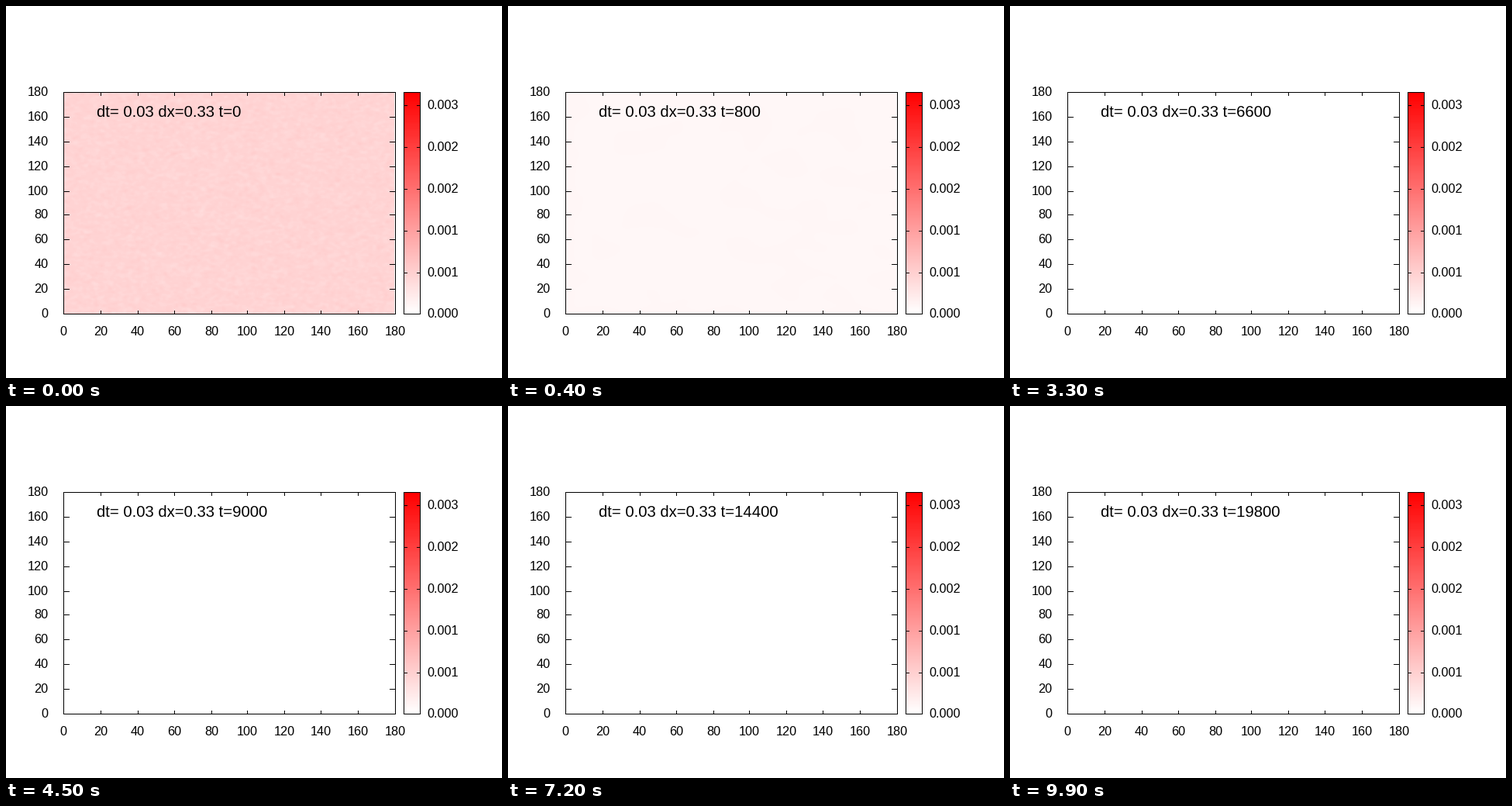
A matplotlib script for the animation above (10000 ms loop, 640 by 480 pixels).

```python
import numpy as np
import matplotlib.pyplot as plt
from matplotlib.animation import FuncAnimation
from matplotlib.colors import LinearSegmentedColormap
from matplotlib.patches import Rectangle

FRAMES, INTERVAL, STEP = 100, 100, 200
N = 180
LEFT, RIGHT, TOP, BOTTOM = 74, 502, 111, 397
BAR_L, BAR_R, BAR_STEP = 513, 534, 53.8
SMALL, LARGE = 16.2, 20.25  # text sizes in pixels

plt.rcParams["font.family"] = "Liberation Sans"
reds = LinearSegmentedColormap.from_list("reds", ["#ffffff", "#ff0000"])

noise_fft = np.fft.fft2(np.random.default_rng(7).standard_normal((N, N)))
freq = np.fft.fftfreq(N)
freq_sq = freq[:, None] ** 2 + freq[None, :] ** 2
cells = np.arange(N)
edge = np.exp(-cells / 2)[:, None] + np.exp(-cells / 2)[None, :]


def level(t):
    """Mean concentration: a quick outbreak that dies out."""
    x = t / 400
    return np.exp(-1.77 + 2.77 * x - 1.78 * x * x)


def field(t):
    """Random start that diffuses into ever larger, fainter patches."""
    var = 0.6 + 0.04 * t
    rough = np.fft.ifft2(noise_fft * np.exp(-2 * np.pi**2 * var * freq_sq)).real
    rough /= rough.std() + 1e-12
    spread = 0.05 * np.exp(-t / 300)
    rim = 0.03 * min(t / 400, 1) * edge
    return level(t) * (1 + spread * rough + rim)


fig = plt.figure(figsize=(6.4, 4.8), dpi=100, facecolor="white")
ax = fig.add_axes([0, 0, 1, 1])
ax.axis("off")


def label(x, y, s, size=SMALL, ha="left"):
    return ax.text(x, y, s, size=size * 0.72, ha=ha, va="baseline", color="black")


def bar(x0, y0, x1, y1):
    """Fill the pixels from (x0, y0) to (x1, y1), both included."""
    ax.add_patch(Rectangle((x0, y0), x1 - x0 + 1, y1 - y0 + 1,
                           fc="black", lw=0, aa=False, zorder=3))


def hline(x0, x1, y):
    bar(x0, y, x1, y)


def vline(x, y0, y1):
    bar(x, y0, x, y1)


def box(x0, x1):
    for y in (TOP, BOTTOM):
        hline(x0, x1, y)
    for x in (x0, x1):
        vline(x, TOP, BOTTOM)


def to_pixel(v, start, end):
    """Map 0..N to a pixel, truncating towards the middle of the axis."""
    return (start + end) // 2 + int((end - start) * (v / N - 0.5))


heat = ax.imshow(field(0), cmap=reds, vmin=0, vmax=1, origin="lower",
                 extent=(LEFT + 1, RIGHT - 1, BOTTOM, TOP + 1),
                 aspect="auto", interpolation="bilinear")
ax.imshow(np.linspace(0, 1, 256)[:, None], cmap=reds, vmin=0, vmax=1,
          origin="lower", extent=(BAR_L, BAR_R, BOTTOM, TOP),
          aspect="auto", interpolation="nearest")
ax.set_xlim(0, 640)
ax.set_ylim(480, 0)

box(LEFT, RIGHT)
box(BAR_L, BAR_R)

for v in range(0, N + 1, 20):
    x = to_pixel(v, LEFT, RIGHT)
    y = to_pixel(v, BOTTOM, TOP)
    label(x, 425, str(v), ha="center")
    label(54.5, y + 5, str(v), ha="right")
    if 0 < v < N:
        vline(x, TOP, TOP + 4)
        vline(x, BOTTOM - 4, BOTTOM)
        hline(LEFT, LEFT + 7, y)
        hline(RIGHT - 7, RIGHT, y)

for k in range(6):
    y = BOTTOM - int(BAR_STEP * k)
    label(543.5, y + 5, f"{0.0006 * k:.3f}")
    hline(BAR_L, BAR_L + 4, y)
    hline(BAR_R - 4, BAR_R, y)

caption = label(117, 143, "", LARGE)


def update(i):
    t = i * STEP
    heat.set_data(field(t))
    caption.set_text(f"dt= 0.03 dx=0.33 t={t}")
    return heat, caption


anim = FuncAnimation(fig, update, frames=FRAMES, interval=INTERVAL,
                     repeat=True, repeat_delay=0)
plt.show()
```
